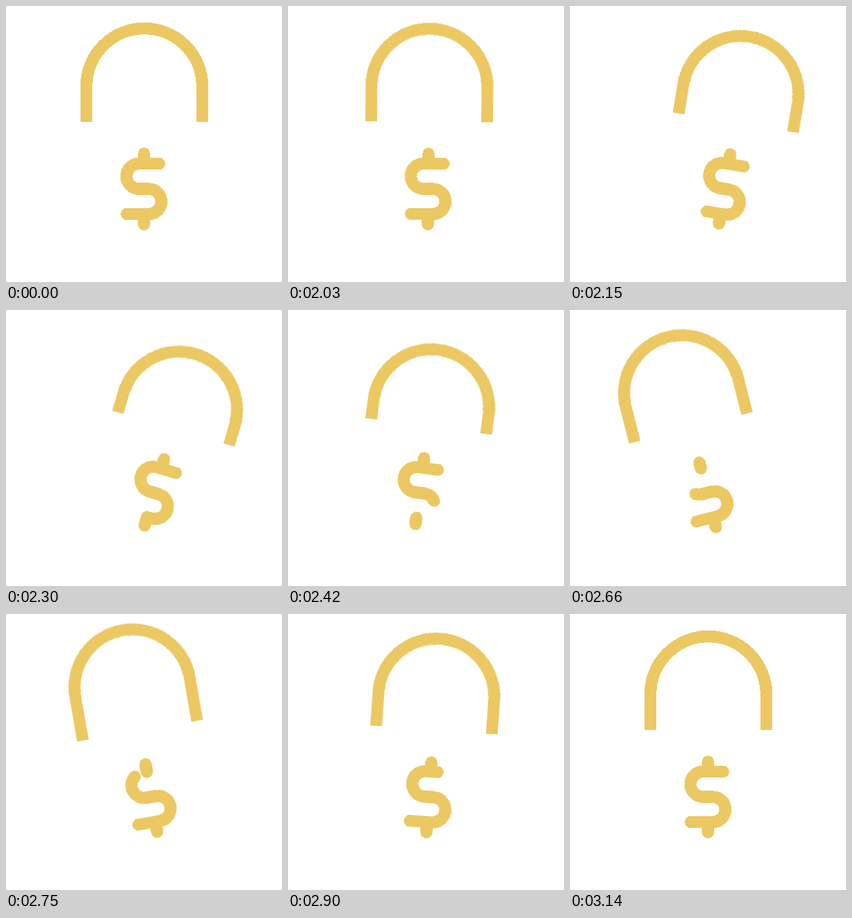
Write an HTML page that moves like this. It is 400x400 px and loops after 3170 ms.

```html
<!DOCTYPE html>
<html lang="en">
<head>
<meta charset="utf-8">
<title>Swinging bag</title>
<style>
  html, body { margin: 0; width: 100%; height: 100%; overflow: hidden; background: #fff; }
  svg { display: block; width: 100vw; height: 100vh; }
  path { fill: none; stroke: #ecc863; stroke-width: 17.5; shape-rendering: crispEdges; }

  .shift, .swing, .handle, .dollar path {
    animation: 3170ms infinite cubic-bezier(.37, 0, .63, 1);
  }
  .shift { animation-name: shift; }
  .swing { animation-name: swing; transform-origin: 200px 265px; }
  .handle { animation-name: bounce; }
  .dollar path {
    animation-name: redraw;
    stroke-linecap: round;
    stroke-dasharray: 1 1;
  }

  @keyframes shift {
    0% { transform: translateX(0); }
    63.09% { transform: translateX(0); animation-timing-function: cubic-bezier(.3, .1, .6, 1); }
    69.09% { transform: translateX(26px); }
    79.5% { transform: translateX(-18.5px); }
    87.54% { transform: translateX(11px); }
    95.58% { transform: translateX(-3px); }
    98.74%, 100% { transform: translateX(0); }
  }
  @keyframes swing {
    0%, 63.09% { transform: rotate(0deg); }
    71.92% { transform: rotate(16.6deg); }
    84.07% { transform: rotate(-14.3deg); }
    92.43% { transform: rotate(4.6deg); }
    98.74%, 100% { transform: rotate(0deg); }
  }
  /* the handle slides in and out behind the bag's top edge */
  @keyframes bounce {
    0%, 63.09% { transform: translateY(0); }
    74.45% { transform: translateY(24.2px); animation-timing-function: cubic-bezier(.6, 0, .8, 1); }
    87.22% { transform: translateY(-12.8px); }
    92.43% { transform: translateY(4px); }
    98.42%, 100% { transform: translateY(0); }
  }
  /* erase from the tail, then draw back in from the tail */
  @keyframes redraw {
    0% { stroke-dashoffset: 0; }
    63.09% { stroke-dashoffset: 0; animation-timing-function: cubic-bezier(.75, 0, .85, .45); }
    80.16% { stroke-dashoffset: 1; animation-timing-function: cubic-bezier(.1, .58, .37, .98); }
    97.79%, 100% { stroke-dashoffset: 2; }
  }
</style>
</head>
<body>
<svg viewBox="0 0 400 400">
  <clipPath id="above"><rect x="0" y="-100" width="400" height="268"/></clipPath>
  <g class="shift">
    <g class="swing">
      <g clip-path="url(#above)">
        <path class="handle" d="M116.5 220V116.5a84 84 0 0 1 168 0V220"/>
      </g>
      <g class="dollar">
        <path pathLength="1" d="M200 214V228.3"/>
        <path pathLength="1" d="M222 228.3H193a18.4 18.4 0 0 0 0 36.8H207a18.2 18.2 0 0 1 0 36.4H175"/>
        <path pathLength="1" d="M200 301.5V316.4"/>
      </g>
    </g>
  </g>
</svg>
</body>
</html>
```
